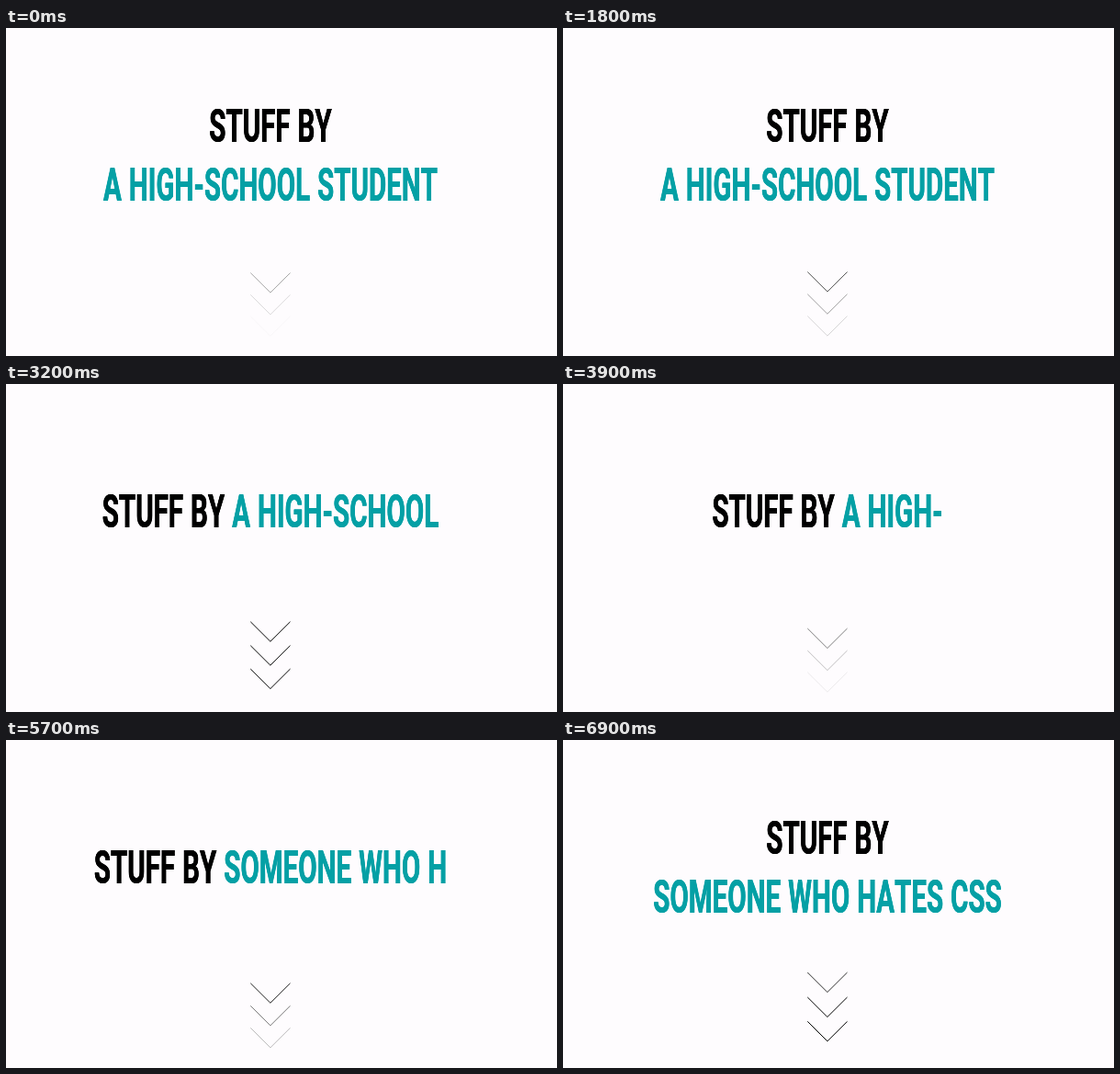
An HTML page for the animation above (7 s loop, 600x357 px).

```html
<!DOCTYPE html>
<html lang="en">
<head>
<meta charset="utf-8">
<title>Stuff by</title>
<style>
  html, body {
    margin: 0;
    width: 100%;
    height: 100%;
    overflow: hidden;
    background: #fefcfe;
  }
  #stage {
    position: absolute;
    inset: 0;
    overflow: hidden;
  }
  /* Condensed display look: one horizontal scale for the whole heading */
  h1 {
    position: absolute;
    left: -187.4px;
    top: 139px;
    width: 950px;
    margin: 0;
    transform: translateY(-50%) scaleX(.597);
    font: bold 49.5px/64px Roboto, "Liberation Sans", sans-serif;
    font-kerning: none;
    word-spacing: 1px;
    text-align: center;
    white-space: nowrap;
    color: #000;
    text-shadow: .3px 0 currentColor, -.3px 0 currentColor;
  }
  #typed { color: #04a0a5; }
  #typed.wrapped { display: block; }
  svg {
    position: absolute;
    inset: 0;
    width: 100%;
    height: 100%;
    fill: none;
    stroke: #000;
  }
</style>
</head>
<body>
<div id="stage">
  <h1>STUFF BY <span id="typed" class="wrapped">A HIGH-SCHOOL STUDENT</span></h1>
  <svg>
    <defs><path id="chevron" d="M266.3 0l21.6 21.5l21.6-21.5"/></defs>
    <use href="#chevron"/>
    <use href="#chevron"/>
    <use href="#chevron"/>
  </svg>
</div>
<script>
  const LOOP = 7000;
  const FIRST = 'A HIGH-SCHOOL STUDENT';
  const SECOND = 'SOMEONE WHO HATES CSS';
  const WRAP_AT = 20;
  const ERASE = { start: 2590, step: 100 };
  const TYPE = { start: 4640, step: 80 };

  const CHEVRON = { top: 267.3, gap: 23.3, drop: 25, cycle: 2000, phase: 1500, lag: 180 };

  const typed = document.getElementById('typed');
  const chevrons = document.querySelectorAll('use');

  const clamp = x => Math.min(1, Math.max(0, x));
  const smooth = x => x * x * (3 - 2 * x);

  function textAt(t) {
    if (t >= TYPE.start) {
      return SECOND.slice(0, Math.floor((t - TYPE.start) / TYPE.step));
    }
    const erased = Math.max(0, Math.ceil((t - ERASE.start) / ERASE.step));
    return FIRST.slice(0, Math.max(0, FIRST.length - erased));
  }

  // Each chevron drops into place, fading in quickly and out slowly
  function drawChevron(el, i, t) {
    const { top, gap, drop, cycle, phase, lag } = CHEVRON;
    const p = (t + phase + i * lag) % cycle / cycle;
    const y = top + i * gap - drop * (1 - p) ** 2.5;
    const fadeIn = smooth(clamp(p / .275));
    const fadeOut = clamp((1 - p) / .425) ** 2;
    el.setAttribute('transform', `translate(0 ${y})`);
    el.setAttribute('opacity', fadeIn * fadeOut);
  }

  function draw(t) {
    const text = textAt(t);
    if (typed.textContent !== text) typed.textContent = text;
    typed.classList.toggle('wrapped', text.length >= WRAP_AT);
    chevrons.forEach((el, i) => drawChevron(el, i, t));
  }

  const begin = performance.now();
  function tick() {
    draw((performance.now() - begin) % LOOP);
    requestAnimationFrame(tick);
  }
  tick();
</script>
</body>
</html>
```
